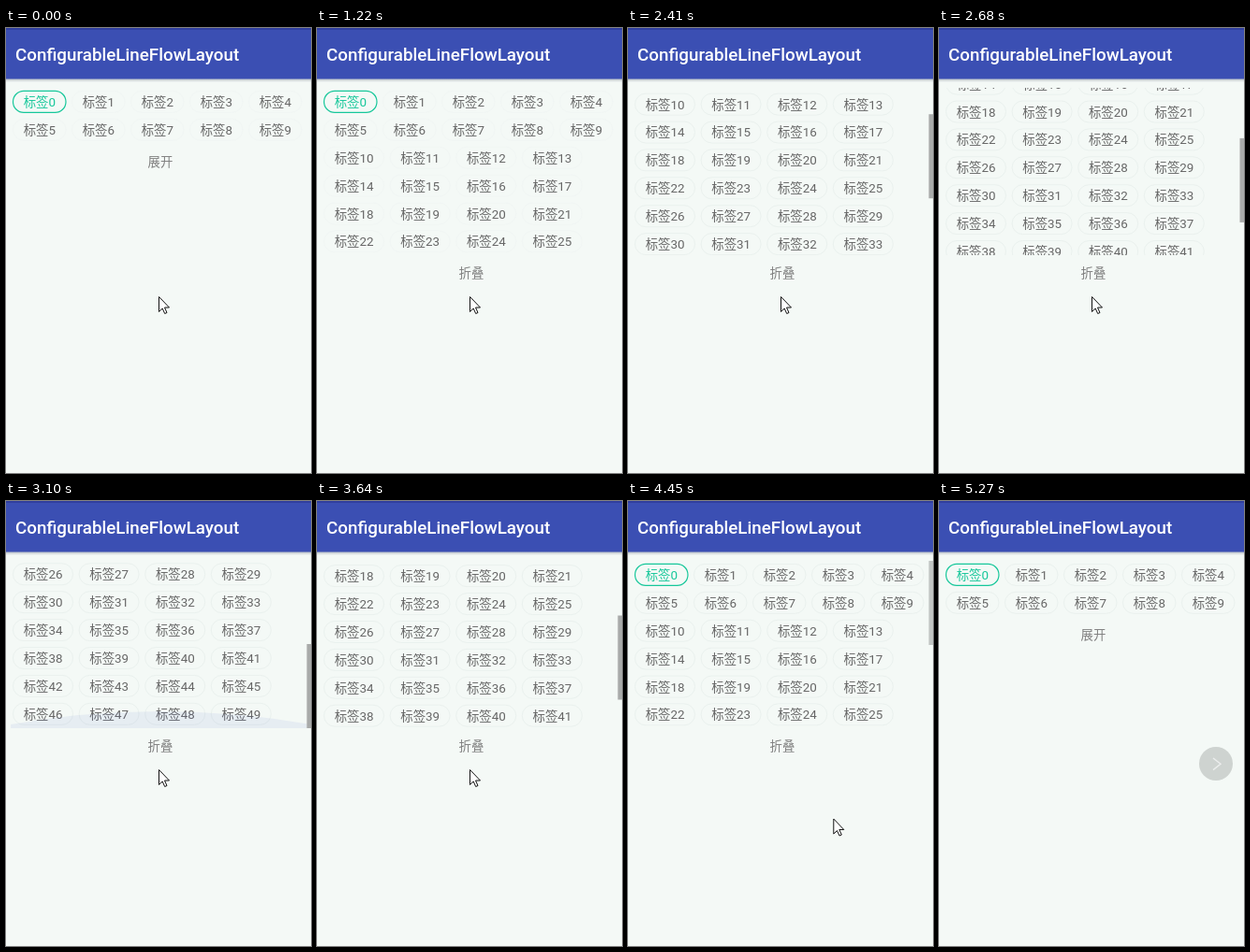
An HTML page for the animation above (7120 ms loop, 326x476 px).

```html
<!DOCTYPE html>
<html lang="zh-CN">
<head>
<meta charset="utf-8">
<style>
  html, body { margin: 0; width: 100%; height: 100%; overflow: hidden; background: #f4f9f6; }
  svg { display: block; width: 326px; height: 476px; }
  text { font: 13.4px Roboto, "Noto Sans CJK SC", "Noto Sans CJK", sans-serif; fill: #666; }
  #title { font-size: 18.8px; font-weight: 500; fill: #fff; }
  #toggle { fill: #7e7e7e; text-anchor: middle; }
  #tags rect { fill: none; stroke: #eaf1ee; }
  #tags.idle rect { stroke: #f1f6f4; }
  #tags .on text { fill: #16c79a; }
  #tags .on rect { stroke: #16c79a; stroke-width: 1.2; }
</style>
</head>
<body>
<svg viewBox="0 0 326 476">
  <defs>
    <clipPath id="view"><rect id="window" x="5" y="64" width="321" height="179"/></clipPath>
    <linearGradient id="shade" x2="0" y2="1">
      <stop stop-color="#b4bbc2"/><stop offset="1" stop-color="#f4f9f6"/>
    </linearGradient>
  </defs>
  <rect width="326" height="476" fill="#f4f9f6"/>
  <rect y="54" width="326" height="4" fill="url(#shade)"/>
  <rect width="326" height="54.5" fill="#3b4fb3"/>
  <rect width="326" height="2" fill="#303f9f"/>
  <text id="title" x="10" y="35.4">ConfigurableLineFlowLayout</text>
  <g clip-path="url(#view)">
    <g id="tags"></g>
    <path id="glow" fill="#3f51b5"/>
    <rect id="bar" x="321.5" width="4.5" height="90" fill="#a9abaa"/>
  </g>
  <text id="toggle" x="165"></text>
  <g id="button">
    <circle cx="296" cy="281" r="18" fill="#ced3d0"/>
    <path d="M293 275l8 6.3-8 6.3" fill="none" stroke="#eceeed" stroke-width="1.4"/>
  </g>
  <path id="cursor" d="M.5.5V16.5L4.2 13 6.7 18.5 9 17.5 6.5 12H11.5Z" fill="#fff" stroke="#111"/>
</svg>
<script>
const LOOP = 7120, STEP = 135, LEAD = 20;
const OPEN = 8, DRAG = 16, CLOSE = 38, END = 39; // in steps
const $ = id => document.getElementById(id);

// Rises evenly from 0 to 1 between steps a and b.
const ramp = (k, a, b) => Math.min(1, Math.max(0, (k - a) / (b - a)));

function set(id, attrs) {
  for (const name in attrs) $(id).setAttribute(name, attrs[name]);
}

function tag(n) {
  const wide = n > 9;
  const i = wide ? n - 10 : n, cols = wide ? 4 : 5;
  const x = 7.5 + i % cols * (wide ? 70.6 : 63);
  const y = 67.4 + (Math.floor(i / cols) + (wide ? 2 : 0)) * 29.9;
  return `<g${n ? '' : ' class="on"'}>
    <rect x="${x}" y="${y}" width="${wide ? 64 : 56.5}" height="23" rx="11.5"/>
    <text x="${x + 11.2}" y="${y + 16.5}">标签${n}</text></g>`;
}
$('tags').innerHTML = Array.from({ length: 50 }, (_, n) => tag(n)).join('');

// Overscroll bulge: edge is where it meets the sides, depth its middle.
function bulge(base, edge, depth) {
  return `M5 ${base}v${edge}Q165 ${base + 2 * depth - edge} 326 ${base + edge}V${base}Z`;
}

function draw(time) {
  const k = Math.floor((time % LOOP + LEAD) / STEP);
  const open = k >= OPEN && k < CLOSE;

  // Two flings down, one back past the top, then settling.
  const scroll = 109 * ramp(k, DRAG - .2, 20) + 71 * ramp(k, 21, 23)
    - 185 * ramp(k, 26, 29) + 5 * ramp(k, 30, 31);
  const top = ramp(k, 28, 29) - ramp(k, 29, 32);
  const bottom = ramp(k, 22, 23) - ramp(k, 23, 27);

  set('window', { height: open ? 179 : 60 });
  set('tags', { transform: `translate(0 ${-scroll})`, class: k < DRAG ? 'idle' : '' });
  set('bar', {
    y: 64 + 89 * Math.max(0, scroll) / 180,
    opacity: ramp(k, DRAG - 1, DRAG) - ramp(k, 32, 35)
  });
  set('glow', {
    d: top > 0 ? bulge(64, 25 * top, 36 * top) : bulge(243, -4 * bottom, -18 * bottom),
    opacity: top > 0 ? .3 * top : .075
  });
  set('toggle', { y: open ? 267 : 147.5 });
  $('toggle').textContent = open ? '折叠' : '展开';
  set('button', { visibility: k >= END ? 'visible' : 'hidden' });

  // The pointer speeds away to the lower right.
  const away = Math.max(0, k - 30) ** 2.3;
  set('cursor', { transform: `translate(${163 + 4.5 * away} ${287 + 4.2 * away})` });
}

function frame(now) {
  draw(now);
  requestAnimationFrame(frame);
}
draw(0);
requestAnimationFrame(frame);
</script>
</body>
</html>
```
